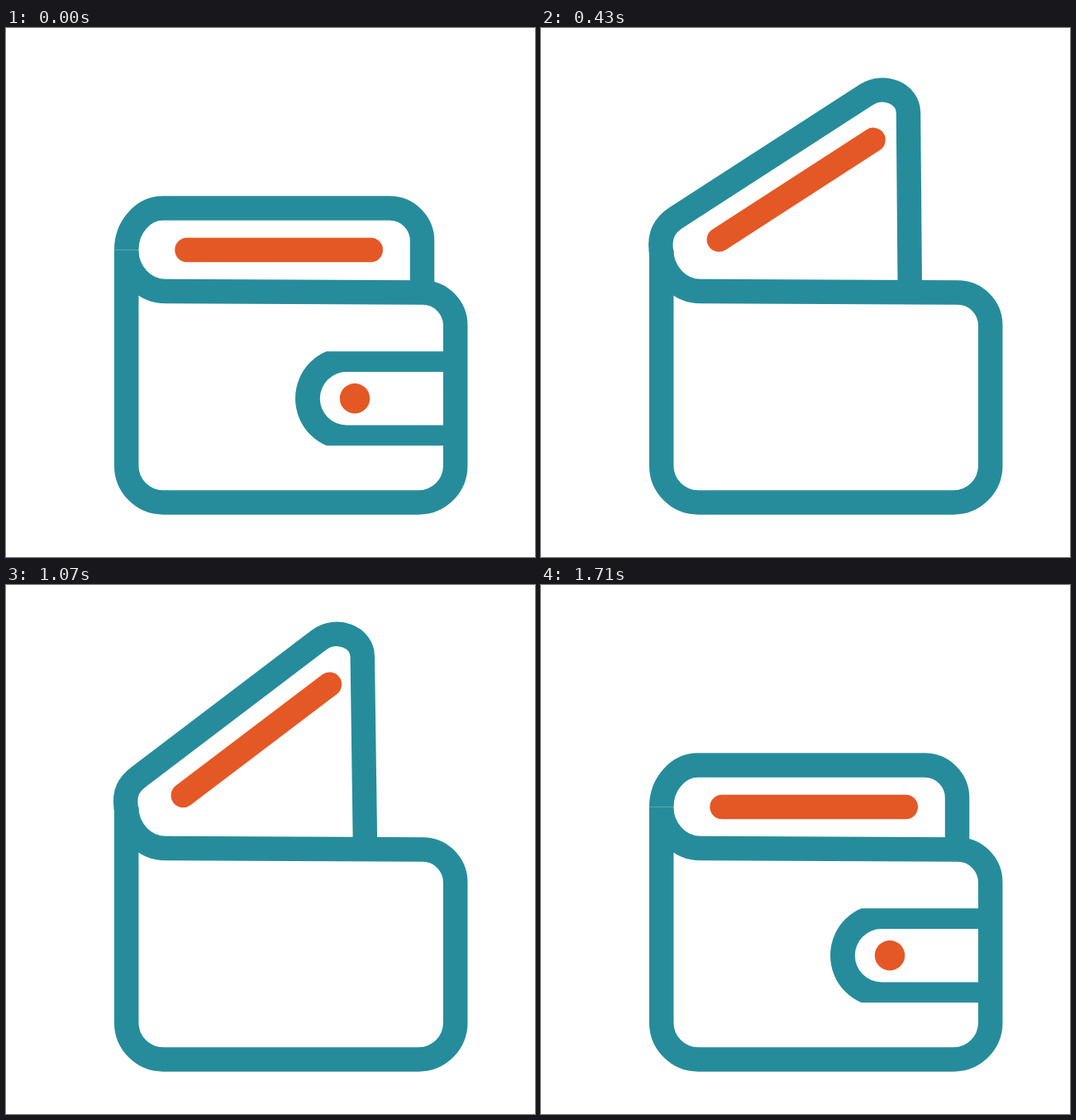
Animation, 640 px wide and 640 px high, one loop 1.87 s. Source, as an HTML page with a canvas:

```html
<!DOCTYPE html>
<html lang="en">
<head>
<meta charset="utf-8">
<title>Wallet</title>
<style>
  html, body { margin: 0; width: 100%; height: 100%; overflow: hidden; background: #fff; }
  canvas { display: block; width: 100%; height: 100%; }
</style>
</head>
<body>
<canvas id="stage" width="640" height="640"></canvas>
<script>
const ctx = document.getElementById('stage').getContext('2d');
const TEAL = '#268c9b', ORANGE = '#e45826';
const LOOP = 1870, STEP = 1000 / 14;
const LINE = 29.5;
const HINGE = { x: 196, y: 268.5 };

// Monotone cubic curve through the given points, flat at both ends.
function curve(xs, ys, endSlopes) {
  const n = xs.length;
  const d = xs.slice(1).map((x, i) => (ys[i + 1] - ys[i]) / (x - xs[i]));
  const m = xs.map((_, i) => {
    if (i === 0) return endSlopes ? d[0] : 0;
    if (i === n - 1) return endSlopes ? d[n - 2] : 0;
    const a = d[i - 1], b = d[i];
    return a * b <= 0 ? 0 : 2 * a * b / (a + b);
  });
  return x => {
    if (x <= xs[0]) return ys[0];
    if (x >= xs[n - 1]) return ys[n - 1];
    let i = 0;
    while (x > xs[i + 1]) i++;
    const w = xs[i + 1] - xs[i], t = (x - xs[i]) / w, u = 1 - t;
    return ys[i] * (1 + 2 * t) * u * u + m[i] * w * t * u * u
      + ys[i + 1] * t * t * (3 - 2 * t) - m[i + 1] * w * t * t * u;
  };
}

// Motion over time, in steps of the 14 per second beat
const flapAngle = curve([0, 4, 8, 9, 12.3, 15, 17, 20, 24],
                        [0, 21.2, 41.1, 42.1, 42.1, 37.2, 25.95, 10.05, 0]);
const claspShift = curve([0, 4, 6, 15, 17, 20, 24],
                         [0, 174, 230, 230, 167, 68, 0]);

// Right side of the flap, by opening angle
const angles = [0, 10.05, 21.2, 25.95, 37.2, 42.1];
const footX = curve(angles, [503.5, 494, 475.2, 463, 434.5, 415.3], true);
const edgeX = curve(angles, [503.5, 493.7, 476.3, 464.3, 431.3, 415.3], true);
const edgeY = curve(angles, [257.5, 206, 155, 132, 87, 72], true);

function stroke(color, cap = 'butt') {
  ctx.strokeStyle = color;
  ctx.lineWidth = LINE;
  ctx.lineCap = cap;
  ctx.lineJoin = 'round';
  ctx.stroke();
}

function disc(x, y, r, color) {
  ctx.beginPath();
  ctx.arc(x, y, r, 0, 2 * Math.PI);
  ctx.fillStyle = color;
  ctx.fill();
}

function drawClasp(shift) {
  const x = 412 + shift, y = 448.2;
  const tab = (r, color) => {
    ctx.beginPath();
    ctx.arc(x, y, r, Math.PI / 2, -Math.PI / 2);
    ctx.lineTo(x + 200, y - r);
    ctx.lineTo(x + 200, y + r);
    ctx.fillStyle = color;
    ctx.fill();
  };
  ctx.save();
  ctx.beginPath();
  ctx.rect(300, 391.2, 243, 114);
  ctx.clip();
  tab(62, TEAL);
  tab(32.2, '#fff');
  disc(x + 10, y, 18.2, ORANGE);
  ctx.restore();
}

function drawBody() {
  ctx.beginPath();
  ctx.moveTo(145.7, 268.5);
  ctx.lineTo(145.7, 529.5);
  ctx.arcTo(145.7, 573.9, 190.2, 573.9, 44.4);
  ctx.lineTo(499.3, 573.9);
  ctx.arcTo(543.7, 573.9, 543.7, 529.5, 44.4);
  ctx.lineTo(543.7, 359.8);
  ctx.bezierCurveTo(543.7, 338, 526, 320.1, 504, 320.1);
  ctx.lineTo(193, 318.5);
  ctx.bezierCurveTo(167, 318.5, 145.7, 296, 145.7, 268.5);
  stroke(TEAL);
}

function drawFlap(deg) {
  const a = deg * Math.PI / 180, c = Math.cos(a), s = Math.sin(a);
  const turn = (x, y) => [HINGE.x + x * c + y * s, HINGE.y - x * s + y * c];
  const open = deg / 42.1;

  // The bar turns rigidly about the hinge.
  ctx.beginPath();
  ctx.moveTo(...turn(23, 0));
  ctx.lineTo(...turn(245.3, 0));
  stroke(ORANGE, 'round');

  // The top edge turns too; the right edge and left corner bend to follow.
  const reach = 21.8 + 4.2 * open * open;
  const squeeze = 1 - 0.42 * open;
  const lean = 0.14 * open;
  const leftX = 145.7 - 0.7 * open;
  const rightX = edgeX(deg), rightY = edgeY(deg);
  ctx.beginPath();
  ctx.moveTo(leftX + 6 * lean, 268.5 + 6 * open);
  ctx.lineTo(leftX, 268.5);
  ctx.bezierCurveTo(leftX - 27.7 * squeeze * lean, 268.5 - 27.7 * squeeze,
    ...turn(-6 - 24.4 * squeeze, -50.4), ...turn(-6, -50.4));
  ctx.lineTo(...turn(268, -50.4));
  ctx.bezierCurveTo(...turn(268 + reach, -50.4),
    rightX, rightY - reach, rightX, rightY);
  ctx.lineTo(footX(deg), 318);
  stroke(TEAL);
}

function frame(now) {
  const beat = Math.floor((now % LOOP + 5) / STEP);
  ctx.fillStyle = '#fff';
  ctx.fillRect(0, 0, 640, 640);
  drawClasp(claspShift(beat));
  drawFlap(flapAngle(beat));
  drawBody();
}

let start;
function tick(now) {
  if (start === undefined) start = now;
  frame(now - start);
  requestAnimationFrame(tick);
}
frame(0);
requestAnimationFrame(tick);
</script>
</body>
</html>
```
